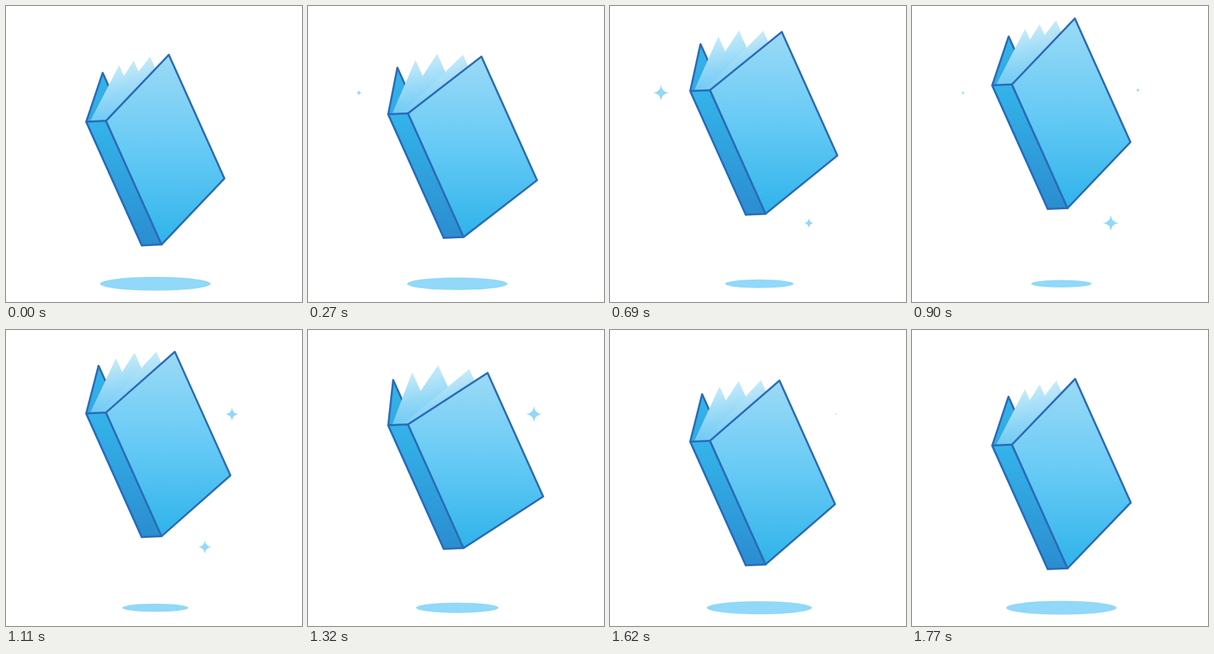
These frames come from a looping animation (450x450 px, 1800 ms). An HTML page:

```html
<!DOCTYPE html>
<html lang="en">
<head>
<meta charset="utf-8">
<title>Floating book</title>
<style>
  html, body { margin: 0; width: 100%; height: 100%; overflow: hidden; background: #fff; }
  svg { display: block; width: 100%; height: 100%; }
  .edge { stroke: #2a6cb9; stroke-width: 3; stroke-linejoin: round; }
</style>
</head>
<body>
<svg id="stage" viewBox="0 0 450 450">
  <defs>
    <linearGradient id="coverFill" x1="0" y1="0" x2="0" y2="1">
      <stop offset="0" stop-color="#9cdaf6"/>
      <stop offset=".5" stop-color="#66caf5"/>
      <stop offset="1" stop-color="#2fb3ea"/>
    </linearGradient>
    <linearGradient id="spineFill" x1="0" y1="0" x2="0" y2="1">
      <stop offset="0" stop-color="#34b4ea"/>
      <stop offset="1" stop-color="#2b8dd0"/>
    </linearGradient>
  </defs>
</svg>
<script>
const LOOP = 1800, TICK = 30, POSES = 48;
const SLANT = [84.5, 188];
const PALE = '#91d8f9';

const stage = document.getElementById('stage');
const defs = stage.querySelector('defs');

function add(parent, tag, attrs) {
  const el = document.createElementNS('http://www.w3.org/2000/svg', tag);
  set(el, attrs);
  return parent.appendChild(el);
}
function set(el, attrs) {
  for (const key in attrs) el.setAttribute(key, attrs[key]);
}

const clamp = v => Math.min(1, Math.max(0, v));
const smooth = v => { const u = clamp(v); return u * u * (3 - 2 * u); };
const mix = (a, b, k) => a + (b - a) * k;
const mixPoint = (a, b, k) => [mix(a[0], b[0], k), mix(a[1], b[1], k)];

// A sheet is a parallelogram swept along the slant of the spine.
function sheet(a, b) {
  const shift = p => [p[0] + SLANT[0], p[1] + SLANT[1]];
  return [a, b, shift(b), shift(a)].join(' ');
}

const shadow = add(stage, 'ellipse', { cx: 227, cy: 422.3, fill: PALE });
const book = add(stage, 'g', {});
const back = add(book, 'polygon', { class: 'edge', fill: 'url(#spineFill)' });

// Points are relative to the top of the spine; each page has a closed and an open tip.
const pages = [
  { base: [128.5, -.5], closed: [172, -84.5], open: [158, -79] },
  { base: [137, -.5], closed: [194, -91.5], open: [198, -90] },
  { base: [144, -.5], closed: [219, -97.5], open: [246, -83.5] }
].map((page, i) => {
  const grad = add(defs, 'linearGradient', { id: 'page' + i, gradientUnits: 'userSpaceOnUse' });
  add(grad, 'stop', { offset: 0, 'stop-color': '#c8ebfa' });
  add(grad, 'stop', { offset: 1, 'stop-color': '#55c1f3' });
  return { ...page, grad, el: add(book, 'polygon', { fill: `url(#page${i})` }) };
});

add(book, 'polygon', { class: 'edge', fill: 'url(#spineFill)', points: sheet([122, 1.3], [152, 0]) });
const front = add(book, 'polygon', { class: 'edge', fill: 'url(#coverFill)' });

const sparkles = [
  { x: 77.5, y: 132, start: 2 },
  { x: 302.3, y: 330, start: 11 },
  { x: 343.5, y: 128, start: 20 }
].map(s => ({ ...s, el: add(stage, 'path', {
  fill: PALE,
  d: 'M0-1Q.1-.1 1 0Q.1 .1 0 1Q-.1 .1-1 0Q-.1-.1 0-1Z'
}) }));

// Covers open and close twice per loop.
function openness(n) {
  const keys = [0, 12.1, 24.25, 36.2, 48];
  const i = keys.findIndex((key, j) => n < keys[j + 1]);
  const k = smooth((n - keys[i]) / (keys[i + 1] - keys[i]));
  return i % 2 ? 1 - k : k;
}

function draw(ms) {
  const n = Math.floor(Math.floor(ms % LOOP / TICK + 1e-4) * TICK * POSES / LOOP + 1e-6);
  const lift = smooth(1 - Math.abs(n - 24) / 24);
  const open = openness(n);

  const width = mix(84, 46, lift);
  set(shadow, { rx: width, ry: width / 8 });
  set(book, { transform: `translate(0 ${174.6 - 55.3 * lift})` });
  set(back, { points: sheet([122, 1.3], mixPoint([147, -73], [129, -67.3], open)) });
  set(front, { points: sheet([152, 0], mixPoint([247.5, -100.4], [273.7, -77.7], open)) });

  for (const { base, closed, open: wide, grad, el } of pages) {
    const tip = mixPoint(closed, wide, open);
    set(el, { points: sheet(base, tip) });
    set(grad, { x1: tip[0], y1: tip[1], x2: tip[0] + 20, y2: 10 });
  }

  for (const { x, y, start, el } of sparkles) {
    const age = n - start;
    const r = 12 * smooth(age / 12) * (1 - smooth((age - 15.5) / 9.5));
    set(el, { transform: `translate(${x} ${y}) scale(${r})`, visibility: r > 0 ? 'visible' : 'hidden' });
  }
}

const began = performance.now();
function loop() {
  draw(performance.now() - began);
  requestAnimationFrame(loop);
}
loop();
</script>
</body>
</html>
```
